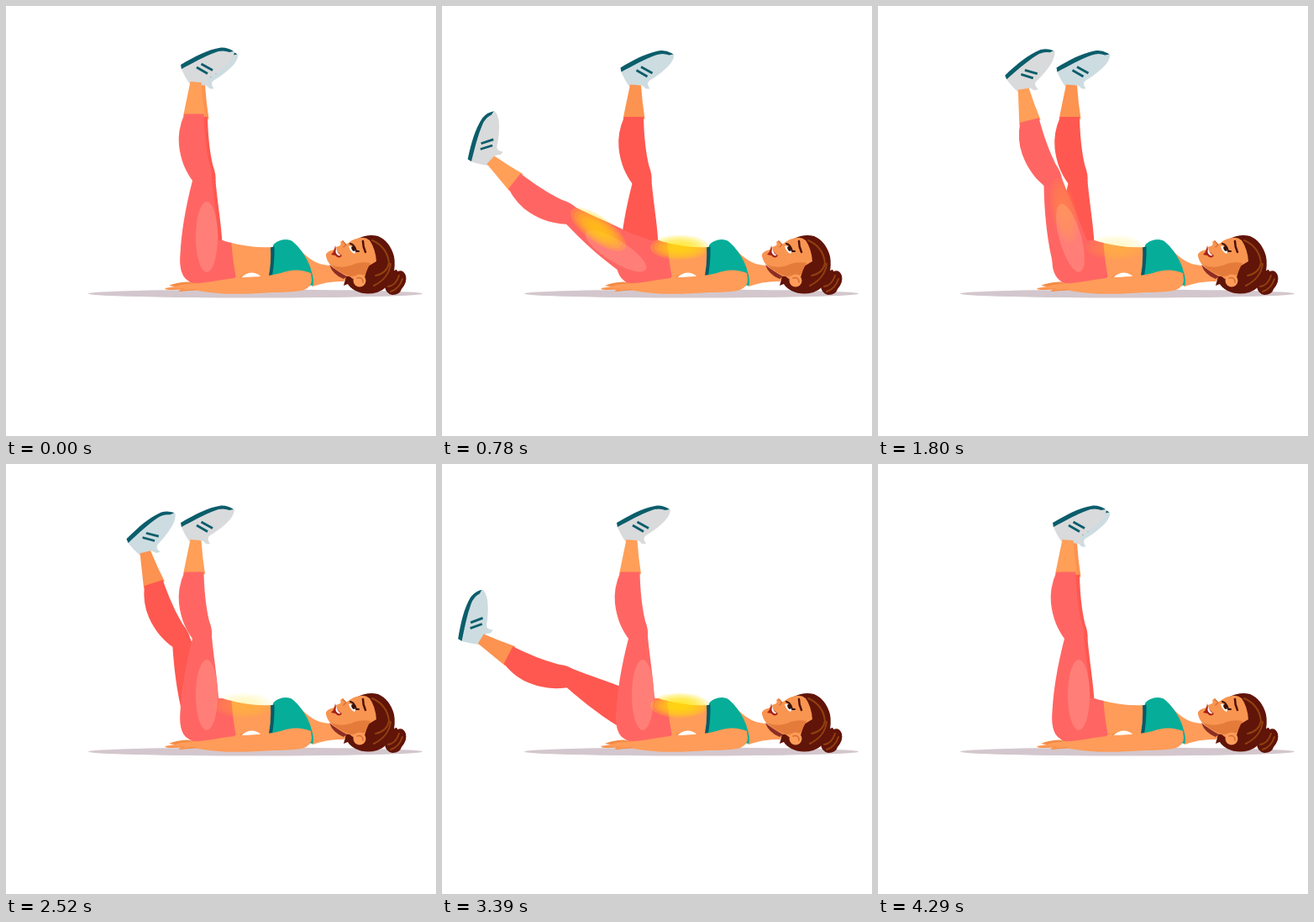
Animation, 512 px wide and 512 px high, one loop 4.47 s. Source, as an HTML page:

```html
<!DOCTYPE html>
<html lang="en">
<head>
<meta charset="utf-8">
<title>Leg raises</title>
<style>
  html, body { margin: 0; width: 100%; height: 100%; overflow: hidden; background: #fff; }
  svg { display: block; width: 100vw; height: 100vh; }
  .near { --pants: #ff6663; --skin: #ff9f58; --shoe: #d9dadb; }
  .far { --pants: #fe5850; --skin: #fc9350; --shoe: #cddce0; }
  .pants { fill: var(--pants); }
  .skin { fill: var(--skin); }
  .shoe { fill: var(--shoe); }
  .line { fill: none; stroke-linecap: round; stroke-linejoin: round; }
</style>
</head>
<body>
<svg viewBox="0 0 512 512" xmlns="http://www.w3.org/2000/svg">
  <ellipse cx="297" cy="342.5" rx="199" ry="5" fill="#d3c7cd"/>
  <g id="far" class="far" transform="translate(4.5 3.5)"></g>

  <!-- torso and neck -->
  <path fill="#ff9c59" d="M266 281.500C284 286 300 288 317 287L345 300L362 334L274 326Z"/>
  <path fill="#ff9c59" d="M350 290C360 301 370 308 385 309L409 321L402 328Q384 327 365 334L352 318Z"/>
  <path fill="#f48943" d="M302 322Q290 314 278 323L300 326Z"/>
  <path class="near pants" d="M216 279L258 279Q263 281 268.500 282Q270 304 274 323L262 331Q238 334 222 330Q208 324 207.500 305Q207 288 216 279Z"/>

  <g id="near" class="near"></g>
  <ellipse id="shine" cx="239" cy="275" rx="13" ry="42" fill="#ff7f78"/>
  <g id="thighGlow" fill="#ffd800"></g>
  <g id="bellyGlow" fill="#ffe000"></g>

  <!-- top -->
  <path fill="#06ad98" d="M318 285C322 279 335 275 342 281Q348 286 352 292Q361 304 364 317Q367 326 365.500 333L345 330L314 321Z"/>
  <path fill="#075a68" d="M315 287.500L319.500 286.500Q320 303 317 321L313 321Q316 305 315 287.500Z"/>

  <!-- arm -->
  <path fill="#fff" d="M280 324Q284 318 293 317.500Q300 318 303 322L294 326Z"/>
  <path fill="#f28b46" d="M194 333Q202 329 216 328.500L236 332L214 336Z"/>
  <path fill="#ff9c59" d="M363 318Q346 311 327 318C310 323 291 322 272 324C254 326 238 330 222 330.500Q208 331 201 334L189 336Q190 338 198 338L208 337.500L205 339.500L226 338.500L238 340.500C262 344 289 343 318 341Q346 341 355 338Q364 334 364 326Z"/>
  <path class="line" stroke="#f28b46" stroke-width="1" d="M191 337L212 337M207 339.500L226 337.500"/>

  <!-- head -->
  <path fill="#611408" d="M419 277Q431 271 443 274Q457 280 462 298Q464 308 461 321Q455 337 442 341Q428 345 416 339Q409 335 407 331L402 333L405 322L425 320L432 306Z"/>
  <path fill="#611408" d="M461 316Q466 312 466 316Q473 313 476 321Q478 329 471 337Q469 344 460 344Q451 342 451 332Q453 322 461 316Z"/>
  <path fill="#f89551" d="M422 276Q414 277 409 281L405 284L401 279L398 281Q400 285 396 286L393 287Q390 291 386 291.500Q380 294 381 298Q383 306 388 310Q398 318 409 322L424 333L431 310L441 304Q440 289 433 279Q428 275 422 276Z"/>
  <path fill="#e57b3b" d="M386 308Q401 314 415 307Q424 304 434 306L427 320L410 322Q398 318 386 308Z"/>
  <path fill="#8c2e24" d="M385 308Q393 315 406 322L402 325Q389 320 385 308Z"/>
  <ellipse cx="421" cy="327" rx="7.500" ry="7.500" fill="#ff9c59"/>
  <path class="line" stroke="#d66c31" stroke-width="1.500" d="M418 324Q425 322 425 329"/>
  <path fill="#a62218" d="M392 285Q393 293 400 297Q397 302 392 297L387 296Q391 293 392 285Z"/>
  <path fill="#fff" d="M393 287Q394 294 398.500 297Q394 298 392.500 293Z"/>
  <path fill="#fff" d="M408 286Q412 285 417 291L415 295Q410 293 408 286Z"/>
  <ellipse cx="413.500" cy="289" rx="2" ry="3" fill="#351008" transform="rotate(-25 413.500 289)"/>
  <path class="line" stroke="#351008" stroke-width="2" d="M410 283Q415 284 417 292L420 292"/>
  <path class="line" stroke="#511106" stroke-width="2.500" d="M425 280Q425 287 428 293"/>
  <path class="line" stroke="#d66c31" stroke-width="1.200" d="M401 280L405 284L402 287"/>
  <path class="line" stroke="#91400f" stroke-width="2" d="M436 279Q454 287 456 306Q454 318 440 321M458 307Q456 324 438 333M455 334Q464 333 468 321M458 340Q468 337 472 325"/>
</svg>
<script>
const LOOP = 4470, STEP = 30;
const $ = id => document.getElementById(id);

const shin = `
  <path class="skin" d="M219.500 90L211 131L237 131Q234 112 232.500 91Z"/>
  <path class="pants" d="M212.500 128.500L235.500 128.500C236 150 238 170 242 187Q246 197 245 206Q243 216 233 218Q225 215 222 208C214 197 208 184 206 166Q204 148 212.500 128.500Z"/>`;
const thigh = `
  <path class="pants" d="M222 208C215 235 209 265 207.500 295Q206 318 214 325Q228 333 245 331L258 300L253 278C251 250 247 228 245 205Q235 193 222 208Z"/>`;
const shoe = `
  <path class="shoe" d="M208 73C222 65 240 55 256 51Q266 50 272 55Q271 63 262 71Q252 80 243 85Q238 88 243 95L238 95Q234 90 230 91L219 93Q213 85 208 73Z"/>
  <path fill="#0b5d6b" d="M208 70C225 60 240 52 256 49.500Q264 49 271 54L266 55Q258 52 250 55C236 60 222 68 209 75Z"/>
  <path class="line" stroke="#0b5d6b" stroke-width="2.800" style="stroke-linecap:butt" d="M232.500 69L246 76.500M227 73L240 80.500"/>`;

// Joint pivots are in leg space; shin and foot lag behind the thigh.
const legs = {
  near: { hip: [232, 300], knee: [233, 206], ankle: [227, 93], max: 66, shin: .88, foot: .81 },
  far: { hip: [227.5, 298.5], knee: [234.5, 204.5], ankle: [226.5, 92.5], max: 65, shin: .985, foot: .79 }
};

for (const id in legs) {
  $(id).innerHTML =
    `<g id="${id}Thigh"><g id="${id}Shin"><g id="${id}Foot">${shoe}</g>${shin}</g>${thigh}</g>`;
}

function glow(id, cx, cy, rx, ry, tilt) {
  let rings = '';
  for (let i = 0; i < 6; i++) {
    const k = 1 - i * .135;
    rings += `<ellipse cx="${cx}" cy="${cy}" rx="${rx * k}" ry="${ry * k}" opacity=".24" transform="rotate(${tilt} ${cx} ${cy})"/>`;
  }
  $(id).innerHTML = rings;
}
glow('thighGlow', 237, 243, 15, 39, 4);
glow('bellyGlow', 283, 287.5, 35, 14.5, 0);

const turn = (id, angle, [x, y]) =>
  $(id).setAttribute('transform', `rotate(${angle} ${x} ${y})`);

function ease(t, from, to) {
  const p = Math.min(1, Math.max(0, (t - from) / (to - from)));
  return .8 * p + .1 * (1 - Math.cos(Math.PI * p));
}

const swing = (t, start) =>
  ease(t, start, start + 900) - ease(t, start + 1110, start + 2040);

function pose(id, amount) {
  const leg = legs[id], a = leg.max * amount;
  turn(id + 'Thigh', -a, leg.hip);
  turn(id + 'Shin', a * (1 - leg.shin), leg.knee);
  turn(id + 'Foot', a * (leg.shin - leg.foot), leg.ankle);
  return a;
}

function draw(ms) {
  const t = Math.floor((ms % LOOP) / STEP) * STEP;
  const near = swing(t, 0), far = swing(t, 2250);
  const a = pose('near', near);
  pose('far', far);
  turn('shine', -a, [238, 312]);
  turn('thighGlow', -a, legs.near.hip);
  $('thighGlow').setAttribute('opacity', near);
  $('bellyGlow').setAttribute('opacity', Math.max(near, far));
}

const start = performance.now();
function tick() {
  draw(performance.now() - start);
  requestAnimationFrame(tick);
}
tick();
</script>
</body>
</html>
```
